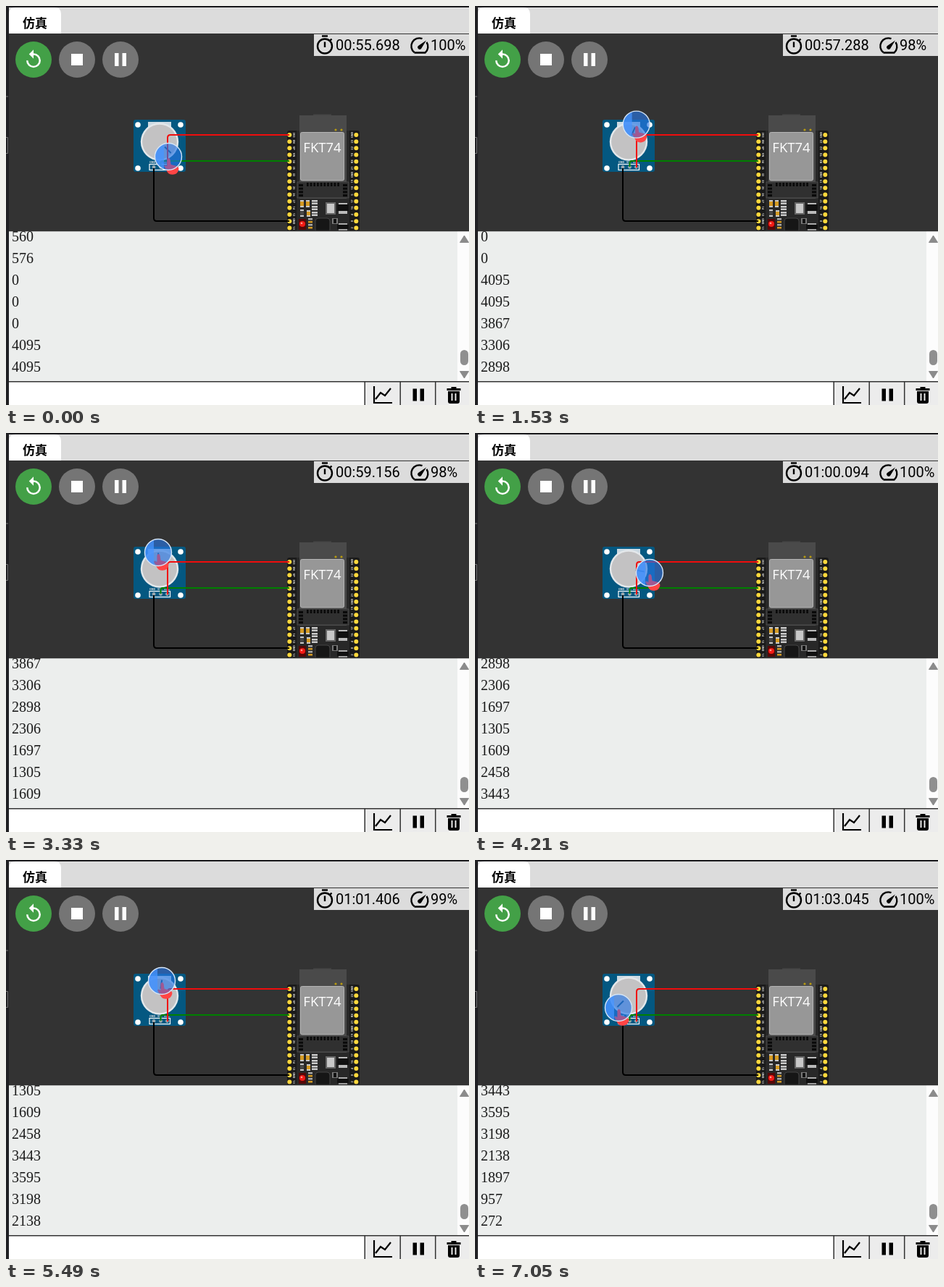
An HTML page that plays this animation: 639x551 px, repeating every 7.09 s.

```html
<!DOCTYPE html>
<html lang="zh">
<head>
<meta charset="utf-8">
<style>
html, body { margin: 0; width: 100%; height: 100%; overflow: hidden; background: #333; }
svg { display: block; }
.ui { font: 20px Roboto, sans-serif; }
.log { font: 20px "Liberation Serif", serif; fill: #1c1c1c; }
.tiny { font: bold 4px Roboto, sans-serif; fill: #ddd; }
</style>
</head>
<body>
<svg width="639" height="551" viewBox="0 0 639 551">
  <rect width="639" height="551" fill="#333"/>

  <!-- potentiometer -->
  <rect x="176" y="157" width="72" height="72" rx="3" fill="#045881"/>
  <g fill="#fff">
    <circle cx="182" cy="164" r="3.8"/><circle cx="241" cy="164" r="3.8"/>
    <circle cx="182" cy="224" r="3.8"/><circle cx="241" cy="224" r="3.8"/>
  </g>
  <rect x="196" y="160" width="32" height="14" fill="#ccdae3"/>
  <circle cx="212" cy="187.5" r="26.2" fill="#e4e8eb"/>
  <circle cx="212" cy="187.5" r="23.8" fill="#c3c2c3"/>
  <path id="mark" d="M212 177.5V165.5" stroke="#0b4a70" stroke-width="2"/>
  <rect x="198" y="218.5" width="28.500" height="8" fill="none" stroke="#fff" stroke-width="1.2"/>
  <g fill="#9aa7ae"><circle cx="204" cy="222.500" r="2.4"/><circle cx="213.500" cy="222.500" r="2.4"/><circle cx="222.500" cy="222.500" r="2.4"/></g>
  <g class="tiny"><text x="198" y="217">GND</text><text x="209" y="217">SIG</text><text x="218" y="217">VCC</text></g>

  <!-- controller board -->
  <path d="M424 149.500h25v3h-25z" fill="#444"/>
  <rect x="388" y="172" width="100" height="150" rx="3" fill="#1a1a1a"/>
  <rect x="401" y="172" width="73" height="150" fill="#282828"/>
  <rect x="405" y="151" width="65" height="115" fill="#4a4a4a"/>
  <path d="M402 243h71v22h-71z" fill="#303030" stroke="#505050" stroke-width=".8"/>
  <rect x="406.500" y="174.500" width="60" height="66.500" rx="2" fill="#979797" stroke="#b5b5b5"/>
  <text x="436.500" y="202" text-anchor="middle" font-family="Open Sans, sans-serif" font-size="18.500" fill="#fff">FKT74</text>
  <g id="parts"></g>

  <g fill="none" stroke-width="2">
    <path d="M204 224V293q0 4 4 4H391" stroke="#000"/>
    <path d="M213.500 222V217q0-3 3-3H391" stroke="#008000"/>
    <path d="M223 223V182q0-4 4-4H391" stroke="#f00d0d"/>
  </g>

  <!-- pointer with highlight -->
  <g id="cursor">
    <path d="M-1.500 4q2-4 4 0l1 7 8 2q4 2 2.500 6a8.500 8 0 0 1-16 1l-4-7q1-3 4.500 0z" fill="#ff4545"/>
    <circle r="18.500" fill="#2677e8" fill-opacity=".63"/>
    <path d="M-6-17.500A18.500 18.500 0 0 0-6 17.500z" fill="#4794ff" fill-opacity=".75"/>
    <path d="M-1.500 4q2-4 4 0l1 7 8 2 2 1-7 4-6 0-5-3q1-3 3-1z" fill="#e0476f" fill-opacity=".4"/>
    <circle r="18.500" fill="none" stroke="#d5e5f7" stroke-width="1.400"/>
  </g>

  <!-- run controls -->
  <circle cx="38" cy="74" r="25" fill="#43a047"/>
  <circle cx="98" cy="74" r="25" fill="#757575"/>
  <circle cx="158" cy="74" r="25" fill="#757575"/>
  <path transform="translate(23 59) scale(1.25)" fill="#fff" d="M12 5V1L7 6l5 5V7a6 6 0 1 1-6 6H4a8 8 0 1 0 8-8z"/>
  <path d="M90 66h16v16h-16zM150 65h5.500v18h-5.500zM160.500 65h5.500v18h-5.500z" fill="#fff"/>

  <!-- clock and speed -->
  <rect x="425" y="39" width="214" height="30" fill="#dcdcdc"/>
  <g fill="none" stroke="#000" stroke-width="2.400">
    <circle cx="440" cy="55.500" r="10"/>
    <path d="M436 41.500h8M440 49.500v7.500M447 48l2.500-2.500"/>
    <path d="M563.500 64A11 11 0 0 1 574.500 45.200M580.500 50A11 11 0 0 1 578.500 64.500h-15"  stroke-linejoin="round" stroke-dasharray="39 0"/>
  </g>
  <path d="M580 47.500l-7 11.500a2.700 2.700 0 1 1-4-4z"/>
  <text class="ui" id="clock" x="455" y="61"></text>
  <text class="ui" id="speed" x="586" y="61"></text>

  <!-- tabs and left edge -->
  <rect width="639" height="38" fill="#dcdcdc"/>
  <rect width="639" height="2" fill="#1c1c1f"/>
  <path d="M4 38V11q0-9 9-9h54q9 0 9 9v27z" fill="#fff"/>
  <text x="23" y="30" font-family="Noto Sans CJK SC, Noto Sans CJK, sans-serif" font-size="17" font-weight="bold">仿真</text>

  <!-- serial monitor -->
  <rect x="4" y="310" width="635" height="209" fill="#eceeed"/>
  <g id="log" class="log"></g>
  <rect x="4" y="280" width="44" height="0"/>
  <rect x="623" y="311" width="16" height="207" fill="#fcfcfc"/>
  <rect x="627" y="475" width="11" height="21" rx="5.500" fill="#8f8f8f"/>
  <path d="M632.500 317l6 9.500h-12zM632.500 514l6-9.500h-12z" fill="#8b8b8b" stroke="#8b8b8b" stroke-linejoin="round"/>
  <rect x="4" y="519" width="635" height="32" fill="#fff"/>
  <rect x="495" y="519" width="144" height="32" fill="#ececec"/>
  <path d="M4 310.500H639M4 518.700H639M495.200 519V551M544.200 519V551M592.700 519V551" stroke="#333" stroke-width="1.500"/>
  <path d="M508 525v23h25M510 543l7-9 6 4 8-10" fill="none" stroke="#000" stroke-width="2.200"/>
  <path d="M561.500 528.500h5.500v17h-5.500zM571.500 528.500h5.500v17h-5.500z"/>
  <path d="M608.500 528h6v-2h7v2h6v3h-19zM610 532h16v14q0 3-3 3h-10q-3 0-3-3z"/>
  <path d="M615.500 535v10M620.500 535v10" stroke="#ececec" stroke-width="2"/>

  <rect width="4" height="551" fill="#202023"/>
  <path d="M0 125h3M0 181.500h2.500v22H0" fill="none" stroke="#777"/>
</svg>
<script>
const LOOP = 7090;
const START = 55.698;
const PRINT_LEAD = 0.32;
const KNOB = { x: 212, y: 187.5 };
const readings = [560, 576, 0, 0, 0, 4095, 4095, 3867, 3306, 2898, 2306, 1697, 1305, 1609,
  2458, 3443, 3595, 3198, 2138, 1897, 957, 272];
const simKeys = [[0, 0], [850, .868], [2210, 2.312], [3330, 3.458], [4210, 4.396], [5490, 5.708], [7050, 7.347]];
const radiusKeys = [[0, 23.8], [.868, 21.3], [2.312, 31], [3.458, 22.6], [4.396, 29.5], [5.708, 20.7], [7.347, 21.6]];
const speedSteps = [[0, 100], [400, 99], [1100, 98], [1800, 100], [3100, 98], [3500, 100], [4750, 99], [6150, 98], [6800, 100]];

// Each printed reading gives the knob angle at its print time.
const angleKeys = readings.slice(7).map((v, k) => [(k + 1) * .5 - PRINT_LEAD, v * 270 / 4095 - 135])
  .concat([[0, 149.7], [.868, 80.5], [2.312, -31.1], [3.458, -5.1], [4.396, 100.7], [5.708, 8.3], [7.347, -139.7]])
  .sort((a, b) => a[0] - b[0]);

const $ = id => document.getElementById(id);
const pad = (n, w) => String(n).padStart(w, '0');

function lerpKeys(keys, t) {
  const i = Math.max(1, keys.findIndex(k => k[0] >= t));
  const [a, b] = [keys[i - 1], keys[i]];
  return a[1] + (b[1] - a[1]) * (t - a[0]) / (b[0] - a[0]);
}

const box = (x, y, w, h, fill) => `<rect x="${x}" y="${y}" width="${w}" height="${h}" fill="${fill}"/>`;
const dot = (x, y, r, fill) => `<circle cx="${x}" cy="${y}" r="${r}" fill="${fill}"/>`;
const chip = (x, y, w, h, fill) => box(x, y, w, h, '#c9c9c9') + box(x, y + 2, w, h - 4, fill);

function buildParts() {
  const left = ['3V3', 'EN', 'VP', 'VN', '34', '35', '32', '33', '25', '26', '27', '14', '12', 'GND', '13'];
  const right = ['GND', '23', '22', 'TX', 'RX', '21', 'GND', '19', '18', '5', '17', '16', '4', '0', '2'];
  let s = dot(455, 171, 1.6, '#b99b10') + dot(463, 171, 1.6, '#b99b10');
  const label = (x, y, turn, text) =>
    `<text class="tiny" text-anchor="middle" transform="translate(${x} ${y}) rotate(${turn})">${text}</text>`;
  for (let i = 0; i < 15; i++) {
    const y = 178 + i * 9.17;
    s += dot(391.3, y, 3, '#ffd83d') + dot(483.3, y, 3, '#ffd83d') +
      label(396, y, 90, left[i]) + label(479, y, -90, right[i]);
  }
  for (let i = 0; i < 10; i++) s += box(415 + i * 4.7, 244, 2.6, 5, '#090909');
  for (let i = 0; i < 4; i++) s += box(404, 246 + i * 4.7, 6, 3, '#090909') + box(465, 246 + i * 4.7, 6, 3, '#090909');
  s += chip(406, 268, 5, 10, '#d49a22') + chip(414, 268, 5, 10, '#d49a22') +
    chip(406, 281, 5, 10, '#484848') + chip(415, 282, 5, 9, '#d49a22');
  for (let i = 0; i < 3; i++) s += chip(422, 268 + i * 8, 8, 6, '#777');
  s += box(441, 271, 14, 17, '#666') + box(443, 273, 10, 13, '#c8c8c8') +
    box(459, 272, 12, 15, '#bbb') + box(457, 274, 16, 9, '#111') +
    box(404, 294, 10, 15, '#550808') + dot(409, 301, 4, '#f21b16') + dot(408, 300, 1.3, '#ff9b8f') +
    '<rect x="427" y="293" width="20" height="20" rx="4" fill="#161616" stroke="#444"/>';
  for (let i = 0; i < 4; i++) s += box(417, 293 + i * 4, 6, 2.5, i % 2 ? '#d49a22' : '#aaa');
  s += box(450, 293, 8, 8, '#777') + box(452, 294, 4, 6, '#111') +
    box(459, 300, 12, 11, '#aaa') + box(457, 302, 16, 6, '#111');
  $('parts').innerHTML = s;
}

let shown = -1;
function draw(now) {
  const t = now % LOOP;
  const tick = t < 50 ? 0 : Math.floor((t - 10) / 40) * 40 + 10;
  const sim = lerpKeys(simKeys, tick);
  const angle = lerpKeys(angleKeys, sim);
  const radius = lerpKeys(radiusKeys, sim);
  const a = angle * Math.PI / 180;
  const x = KNOB.x + radius * Math.sin(a), y = KNOB.y - radius * Math.cos(a);
  $('cursor').setAttribute('transform', `translate(${x.toFixed(1)} ${y.toFixed(1)})`);
  $('mark').setAttribute('transform', `rotate(${Math.max(-135, Math.min(135, angle))} ${KNOB.x} ${KNOB.y})`);

  const ms = Math.round((START + sim) * 1000);
  $('clock').textContent = `${pad(Math.floor(ms / 60000), 2)}:${pad(Math.floor(ms / 1000) % 60, 2)}.${pad(ms % 1000, 3)}`;
  $('speed').textContent = speedSteps.filter(s => s[0] <= tick).pop()[1] + '%';

  const last = 6 + Math.floor((sim + PRINT_LEAD) / .5);
  if (last !== shown) {
    shown = last;
    $('log').innerHTML = readings.slice(last - 6, last + 1)
      .map((v, i) => `<text x="8" y="${325 + i * 30}">${v}</text>`).join('');
  }
}

buildParts();
const begin = performance.now();
function frame() {
  draw(performance.now() - begin);
  requestAnimationFrame(frame);
}
frame();
</script>
</body>
</html>
```
